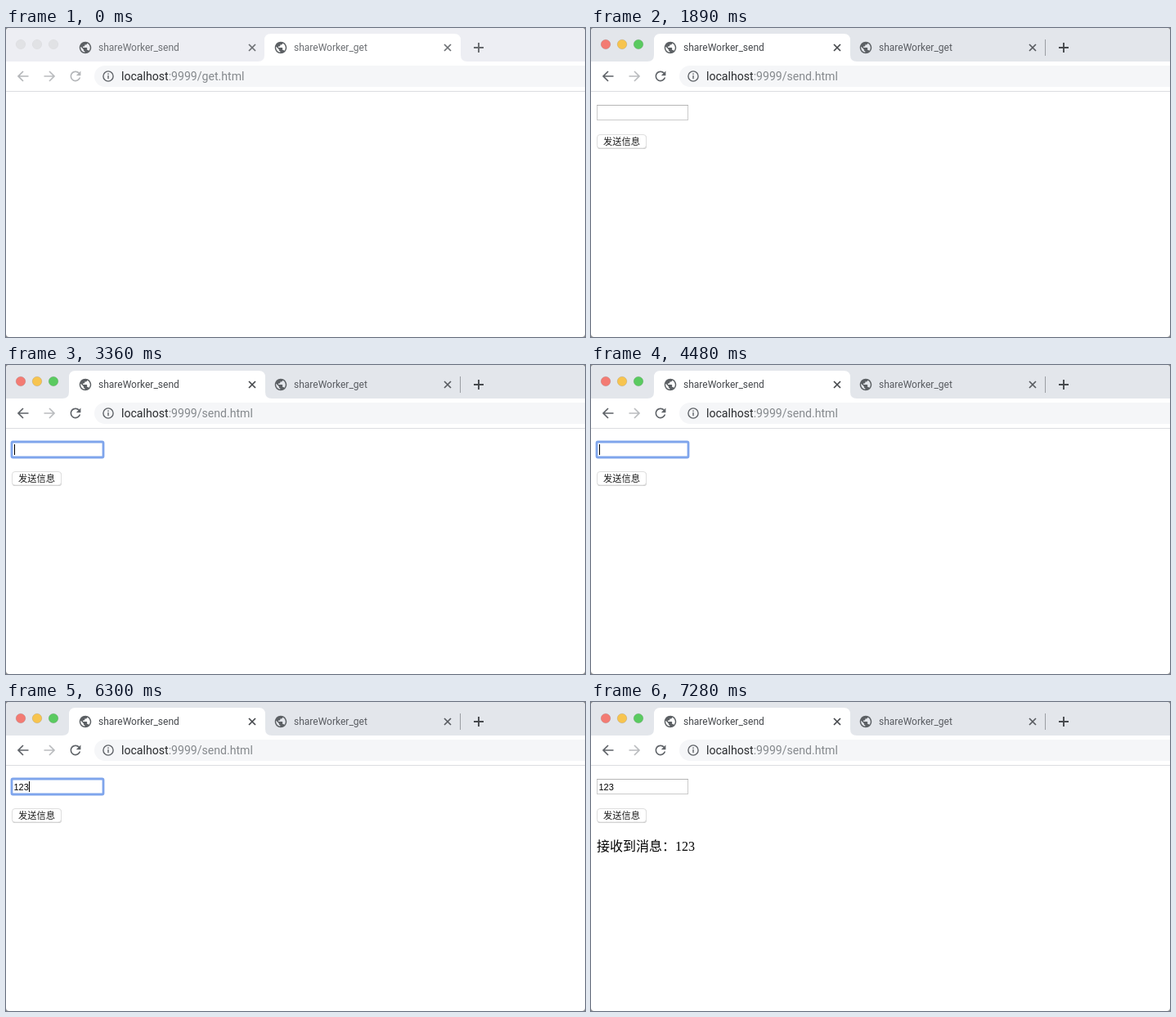
Animation of 708x378 px, one loop 8000 ms. Source, as an HTML page:

```html
<!DOCTYPE html>
<html lang="zh-CN">
<head>
<meta charset="utf-8">
<title>Two tabs</title>
<style>
  html, body { margin: 0; width: 100%; height: 100%; overflow: hidden; background: #8e8e8e; }
  svg { display: block; width: 708px; height: 378px; border-radius: 4px; background: #fff; }
  text { font-family: Roboto, "Open Sans", sans-serif; white-space: pre; }

  #win { --strip: #e3e6eb; --front: #45484c; --back: #585b60; --nav: #5f6368; --plus: #46494d;
         --red: #f37b73; --yellow: #f7c44f; --green: #5aca60; --rim: rgba(0, 0, 0, .1); }
  #win.away { --strip: #edeef3; --front: #6c6f73; --back: #6c6f73; --nav: #b4b6b9; --plus: #66696d;
              --red: #e1e2e5; --yellow: #e1e2e5; --green: #e1e2e5; --rim: rgba(0, 0, 0, .03); }
  .strip { fill: var(--strip); }
  .lights circle { stroke: var(--rim); }
  .title { font-size: 12px; }
  .line { fill: none; stroke-width: 1.7; }
  .url { font-size: 14.1px; fill: #292b2e; }
  .url .path { fill: #85898d; }
  .field { font: 11px "Liberation Sans", Arial, sans-serif; }
  .label { font: 11.25px "Noto Sans CJK SC", "Noto Sans CJK", sans-serif; text-anchor: middle; }
  .message { font: 16px "Liberation Serif", "Noto Sans CJK SC", "Noto Sans CJK", serif; }
</style>
</head>
<body>
<svg id="win" viewBox="0 0 708 378">
  <defs>
    <path id="globe" transform="translate(-8.7 -8.7) scale(.725)" d="M12 2C6.48 2 2 6.48 2 12s4.48 10 10 10 10-4.48 10-10S17.52 2 12 2zm-1 17.93c-3.95-.49-7-3.85-7-7.93 0-.62.08-1.21.21-1.79L9 15v1c0 1.1.9 2 2 2zm6.9-2.54c-.26-.81-1-1.39-1.9-1.39h-1v-3c0-.55-.45-1-1-1H8v-2h2c.55 0 1-.45 1-1V7h2c1.1 0 2-.9 2-2v-.41c2.93 1.19 5 4.06 5 7.41 0 2.08-.8 3.97-2.1 5.39z"/>
    <path id="cross" class="line" d="M-4-4L4 4M4-4L-4 4"/>
    <path id="arrow" class="line" d="M6.5 0H-6M0-6L-6 0L0 6"/>
    <linearGradient id="press" x2="0" y2="1">
      <stop stop-color="#6cb0fa"/>
      <stop offset="1" stop-color="#1a72f2"/>
    </linearGradient>
    <filter id="soft" x="-10%" y="-50%" width="120%" height="200%"><feGaussianBlur stdDeviation=".55"/></filter>
  </defs>

  <rect class="strip" width="708" height="41"/>
  <g class="lights">
    <circle cx="18" cy="20" r="5.8" fill="var(--red)"/>
    <circle cx="38" cy="20" r="5.8" fill="var(--yellow)"/>
    <circle cx="58" cy="20" r="5.8" fill="var(--green)"/>
  </g>
  <path id="tab" fill="#fff" d="M-8 41Q0 41 0 33V15Q0 7 8 7H232Q240 7 240 15V33Q240 41 248 41z"/>
  <g id="sendTab">
    <use href="#globe" x="97" y="24" fill="#5c6064"/>
    <text class="title" x="113" y="28">shareWorker_send</text>
    <use href="#cross" x="301" y="24" stroke="currentColor"/>
  </g>
  <g id="getTab">
    <use href="#globe" x="336" y="24" fill="#5c6064"/>
    <text class="title" x="352" y="28">shareWorker_get</text>
    <use href="#cross" x="540" y="24" stroke="currentColor"/>
  </g>
  <path id="divider" d="M555.5 14V34" stroke="#9a9da2"/>
  <path d="M572 24H584M578 18V30" stroke="var(--plus)" stroke-width="1.9"/>

  <use href="#arrow" x="21" y="59" stroke="var(--nav)"/>
  <use href="#arrow" transform="translate(53 59) scale(-1 1)" stroke="#babcbf"/>
  <path transform="translate(75.4 49.4) scale(.8)" fill="var(--nav)" d="M17.65 6.35C16.2 4.9 14.21 4 12 4c-4.42 0-8 3.58-8 8s3.58 8 8 8c3.73 0 6.84-2.55 7.73-6h-2.08c-.82 2.33-3.04 4-5.65 4-3.31 0-6-2.69-6-6s2.69-6 6-6c1.66 0 3.14.69 4.22 1.78L13 11h7V4z"/>
  <rect x="108" y="46" width="640" height="26" rx="13" fill="#f5f6f8"/>
  <g stroke="#5f6368" stroke-width="1.4" fill="none">
    <circle cx="125" cy="59" r="6.1"/>
    <path d="M125 58V62.3M125 55.4V56.9"/>
  </g>
  <text class="url" x="141" y="64">localhost<tspan class="path">:9999/<tspan id="file"></tspan></tspan></text>
  <path d="M0 77.5H708" stroke="#dcdde0"/>

  <g id="page">
    <rect x="7.5" y="94.5" width="111" height="18" fill="#fff" stroke="#cbcbcb"/>
    <path d="M7 94.5H119" stroke="#b5b5b5"/>
    <rect id="ring" x="7" y="94" width="112" height="19" rx="1.5" fill="none" stroke="#7fa5ec" stroke-width="2.8" filter="url(#soft)"/>
    <text id="value" class="field" x="9.5" y="108"></text>
    <path id="caret" stroke="#000"/>
    <rect x="7.5" y="131" width="60.5" height="17" rx="3.5" fill="#c9c9c9"/>
    <rect id="button" x="7.5" y="130.5" width="60" height="16.5" rx="3.5" stroke="#dedede"/>
    <text id="label" class="label" x="37.5" y="143">发送信息</text>
    <text id="message" class="message" x="7" y="181.5">接收到消息：123</text>
  </g>
</svg>
<script>
const LOOP = 8000;
const SWITCH = 1890, FOCUS = 3360, PRESS = 7140, RELEASE = 7280;
const KEYS = [5250, 5530, 5810];
const BLINK = 560;
const DIGIT = 6.12;

const $ = id => document.getElementById(id);
const show = (id, on) => $(id).style.display = on ? "" : "none";
const tint = (id, color) => {
  $(id).style.fill = color;
  $(id).style.color = color;
};

function draw(t) {
  const sending = t >= SWITCH;
  $("win").classList.toggle("away", !sending);
  $("tab").setAttribute("transform", `translate(${sending ? 77 : 316} 0)`);
  tint("sendTab", sending ? "var(--front)" : "var(--back)");
  tint("getTab", sending ? "var(--back)" : "var(--front)");
  $("file").textContent = sending ? "send.html" : "get.html";
  show("divider", sending);
  show("page", sending);

  // Each key press restarts the caret's blink.
  const focused = t >= FOCUS && t < PRESS;
  const typed = KEYS.filter(k => t >= k).length;
  const since = t - (typed ? KEYS[typed - 1] : FOCUS);
  const x = 10.5 + Math.round(typed * DIGIT);
  $("value").textContent = "123".slice(0, typed);
  $("caret").setAttribute("d", `M${x} 97V110`);
  show("caret", focused && Math.floor(since / BLINK) % 2 === 0);
  show("ring", focused);

  const pressed = t >= PRESS && t < RELEASE;
  $("button").style.fill = pressed ? "url(#press)" : "#fff";
  $("label").style.fill = pressed ? "#fff" : "#1c1c1c";
  show("message", t >= RELEASE);
}

const start = performance.now();
function tick() {
  draw((performance.now() - start) % LOOP);
  requestAnimationFrame(tick);
}
tick();
</script>
</body>
</html>
```
